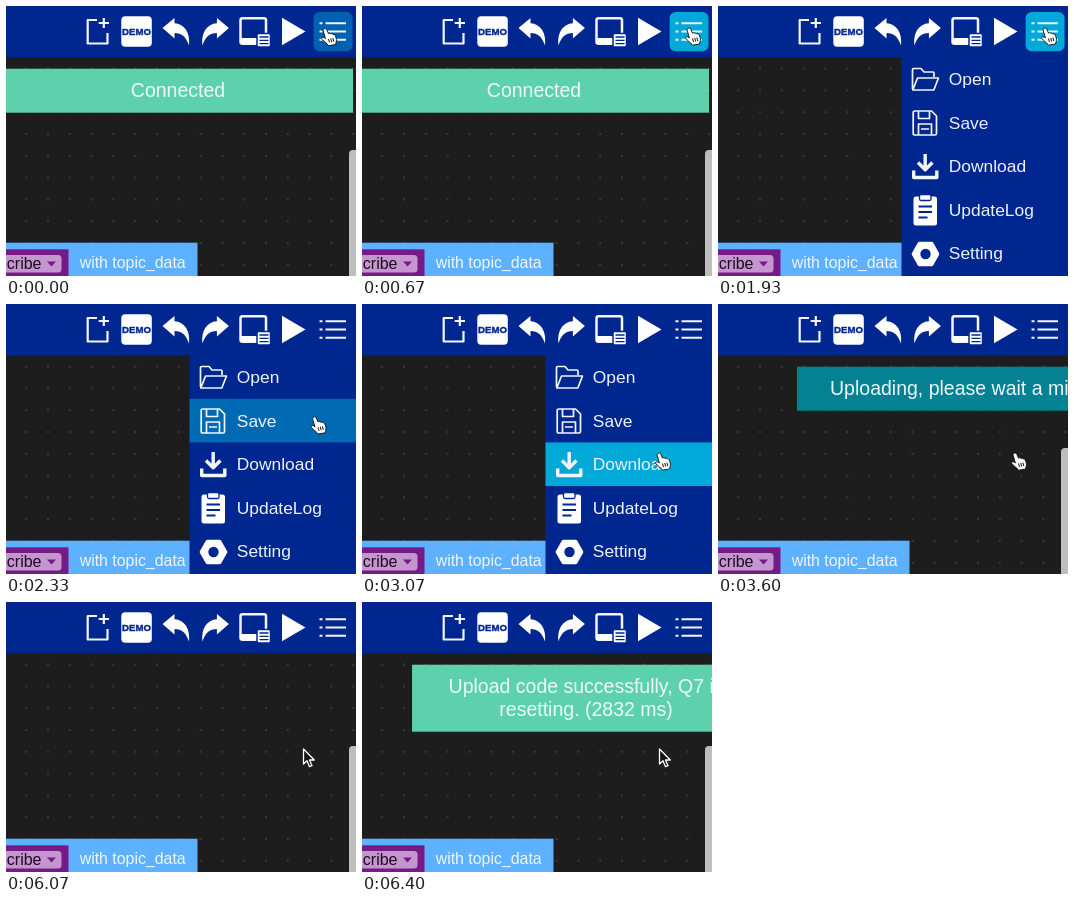
Recreate the animation shown at these times as an HTML page. Size 350 px wide and 270 px high, loop 6.47 s.

```html
<!DOCTYPE html>
<html lang="en">
<head>
<meta charset="utf-8">
<title>Block editor upload</title>
<style>
html, body { margin: 0; width: 100%; height: 100%; overflow: hidden; background: #1d1d1d; }
svg { display: block; width: 350px; height: 270px; font-family: "Liberation Sans", Arial, sans-serif; }
.line { fill: none; stroke: #f2f5fb; stroke-width: 1.7; stroke-linejoin: round; }
.white { fill: #fff; }
.navy { fill: #00278f; }
.toast text { font-size: 19.5px; fill: #ecf8f6; text-anchor: middle; }
.menu text { font-size: 17.4px; fill: #edf1fa; }
</style>
</head>
<body>
<svg viewBox="0 0 350 270">
  <defs>
    <pattern id="dots" x="9.3" y="51.7" width="21.8" height="21.8" patternUnits="userSpaceOnUse">
      <circle cx="10.9" cy="10.9" r=".75" fill="#606060"/>
    </pattern>
    <path id="arrow" d="M156.500 22 L168.500 12 V17.300 C178.500 17.800 184.500 27 183 39.500 C180 31 176 27 168.500 27 V32.500 Z"/>
  </defs>

  <!-- workspace -->
  <rect width="350" height="270" fill="#1d1d1d"/>
  <rect y="52" width="350" height="218" fill="url(#dots)"/>
  <rect x="-5" y="236.700" width="196.500" height="40" fill="#5eb1ff"/>
  <rect x="-5" y="243.300" width="67.500" height="35" fill="#751a86"/>
  <rect x="-10" y="249" width="65.500" height="17.500" rx="3.500" fill="#c595d0"/>
  <text x="35.500" y="262.700" font-size="16" text-anchor="end" fill="#1c0a20">Subscribe</text>
  <path d="M41 255.500 H50 L45.500 260.500 Z" fill="#751a86"/>
  <text x="73.700" y="262" font-size="15.900" fill="#edf6ff">with topic_data</text>
  <rect x="343" y="144" width="14" height="140" rx="4" fill="#bdbdbd"/>

  <!-- notifications -->
  <g class="toast" id="connected">
    <rect x="-2" y="62.700" width="349" height="44" fill="#5dd1ac"/>
    <text x="172" y="91">Connected</text>
  </g>
  <g class="toast" id="uploading">
    <rect x="-2" y="62.700" width="349" height="44" fill="#048294"/>
    <text x="172" y="91">Uploading, please wait a minute.</text>
  </g>
  <g class="toast" id="success">
    <rect x="-2" y="62.700" width="349" height="67" fill="#5dd1ac"/>
    <text x="172" y="91">Upload code successfully, Q7 is</text>
    <text x="172" y="114">resetting. (2832 ms)</text>
  </g>

  <!-- menu -->
  <g class="menu" id="menu">
    <rect class="navy" x="183.500" y="50" width="167" height="220"/>
    <g id="rows"></g>
    <path class="line" d="M194.500 83 V63.500 Q194.500 62.500 195.500 62.500 H203 L206 66 H215 Q216 66 216 67 V71 M194.800 84 L199.500 72 H220.500 L215.800 84 Z"/>
    <path class="line" d="M197 105 H213.500 L218.500 110 V127.500 Q218.500 129 217 129 H197 Q195.200 129 195.200 127.500 V106.500 Q195.200 105 197 105 Z M200.500 105 V112.500 H211.500 V105 M200.500 129 V118 H213.500 V129 M203 123 H211"/>
    <path class="line" style="stroke-width:3.400" d="M207.200 148 V162 M200 156.500 L207.200 163.700 L214.400 156.500 M195.700 164.500 V171.500 H218.800 V164.500"/>
    <rect class="white" x="195.500" y="190.500" width="23.500" height="29" rx="2.500"/>
    <rect x="201.500" y="188.500" width="11.500" height="6" rx="1.500" fill="#fff" stroke="#00278f" stroke-width="1.300"/>
    <path fill="none" stroke="#00278f" stroke-width="2" d="M200.500 200.500 H214 M200.500 206 H214 M200.500 211.500 H209.500"/>
    <path fill="#fff" stroke="#fff" stroke-width="4" stroke-linejoin="round" d="M219.300 248 L213.500 258.300 H201.500 L195.700 248 L201.500 237.700 H213.500 Z"/>
    <circle class="navy" cx="207.500" cy="248" r="5.200"/>
    <g id="labels"></g>
  </g>

  <!-- toolbar -->
  <rect class="navy" width="350" height="51.500"/>
  <rect id="hover" x="307.600" y="6" width="38.900" height="39.300" rx="6" fill="#00a9d8"/>
  <path class="line" style="stroke-width:2.200" d="M91 14 H81.700 V37.500 H101.500 V27 M97.800 12 V22 M92.700 17 H103"/>
  <rect class="white" x="115.300" y="10.300" width="30.500" height="30.500" rx="4"/>
  <text x="130.500" y="29.300" font-size="9.600" font-weight="bold" text-anchor="middle" fill="#00278f" stroke="#00278f" stroke-width=".4">DEMO</text>
  <use href="#arrow" class="white"/>
  <use href="#arrow" class="white" transform="matrix(-1 0 0 1 379.400 0)"/>
  <rect class="line" style="stroke-width:2.500" x="234.500" y="12.300" width="25.500" height="25.500" rx="2"/>
  <rect class="white" x="234.500" y="32" width="20" height="6"/>
  <rect x="251" y="27.500" width="13.500" height="13.500" rx="1.500" fill="#fff" stroke="#00278f" stroke-width="1.500"/>
  <path stroke="#00278f" stroke-width="1.300" d="M253.500 31 H262.500 M253.500 34.300 H262.500 M253.500 37.600 H262.500"/>
  <path class="white" d="M276 11.800 L299.500 25.500 L276 39.300 Z"/>
  <path fill="none" stroke="#f2f5fb" stroke-width="2.100" d="M313.500 17.300 h3 m3 0 h20.500 M313.500 25.500 h3 m3 0 h20.500 M313.500 33.700 h3 m3 0 h20.500"/>

  <!-- pointers -->
  <g id="hand">
    <path transform="scale(1.08 1)" fill="#fff" stroke="#111" stroke-width=".9" d="M3.400 1.200c1-.5 2 0 2.400.9l1.600 4c.6-.6 1.800-.6 2.200.3.700-.5 1.800-.2 2.100.6.800-.3 1.700.1 2 1 .5 1.500 1.300 3.500 1 5.600-.1 1-.6 1.700-.6 3.400l-6.600 1.200c-.6-1.200-2-2.200-3.400-3.600-.9-.9-2.400-2.300-2.900-3.200-.5-1 .4-1.900 1.400-1.600.7.2 1.300.7 1.900 1.200L2.500 3.400c-.3-.9 0-1.800.9-2.200z"/>
    <path fill="none" stroke="#111" d="M8 11.500l1 3.500 M10.200 11l1 3.500 M12.300 10.500l1 3.500"/>
  </g>
  <path id="pointer" fill="#161616" stroke="#fff" stroke-width="1.300" stroke-linejoin="round"
    d="M297.500 147 V162 L301 158.800 L303.500 164.700 L306 163.700 L303.500 158 H308.300 Z"/>
</svg>
<script>
const LOOP = 6470;
const ROW = 43.6;
const $ = id => document.getElementById(id);

// Piecewise linear value from [time, value] steps.
function at(t, steps) {
  const i = steps.findIndex(s => s[0] > t);
  if (i < 0) return steps[steps.length - 1][1];
  if (i === 0) return steps[0][1];
  const [t0, a] = steps[i - 1], [t1, b] = steps[i];
  return a + (b - a) * (t - t0) / (t1 - t0);
}

const cursorX = [[0, 314.5], [70, 314.5], [200, 322.5], [2000, 322.5], [2130, 318],
  [2270, 308], [2470, 295], [2600, 295], [2670, 292.5]];
const cursorY = [[0, 21.5], [200, 21], [2000, 21], [2130, 45],
  [2270, 95], [2470, 150], [2600, 150], [2670, 148]];
const hover = [[70, .45], [200, 1], [2050, 1], [2230, 0]];
const menu = [[790, 0], [1000, 1], [3260, 1], [3400, 0]];
const rowHover = [
  [[2100, 0], [2190, .6], [2330, 0]],
  [[2230, 0], [2310, .6], [2450, 0]],
  [[2350, 0], [2500, 1]]
];

const NS = "http://www.w3.org/2000/svg";
function add(parent, tag, attrs, text = "") {
  const el = document.createElementNS(NS, tag);
  for (const k in attrs) el.setAttribute(k, attrs[k]);
  el.textContent = text;
  return parent.appendChild(el);
}

const rows = rowHover.map((_, i) => add($("rows"), "rect",
  { x: 183.5, y: 51.2 + i * ROW, width: 167, height: ROW, fill: "#00a9d8" }));
["Open", "Save", "Download", "UpdateLog", "Setting"].forEach((label, i) =>
  add($("labels"), "text", { x: 230.8, y: 79 + i * ROW }, label));

const show = (el, on) => { el.style.display = on ? "" : "none"; };
const move = (el, x, y) => el.setAttribute("transform", `translate(${x} ${y})`);

// Toast enters from the right, then goes at once.
function slide(el, t, start, end) {
  const p = Math.min(1, Math.max(0, (t - start) / 650));
  show(el, t >= start && t < end);
  move(el, 350 * (1 - p) ** 5, 0);
}

function draw(t) {
  show($("connected"), t < 800);
  slide($("uploading"), t, 3436, 6070);
  slide($("success"), t, 6195, LOOP);
  $("hover").style.opacity = at(t, hover);
  $("menu").style.opacity = at(t, menu);
  rows.forEach((row, i) => { row.style.opacity = at(t, rowHover[i]); });
  const arrow = t >= 3730;
  show($("hand"), !arrow);
  show($("pointer"), arrow);
  move($("hand"), at(t, cursorX), at(t, cursorY));
}

const begin = performance.now();
function tick() {
  draw((performance.now() - begin) % LOOP);
  requestAnimationFrame(tick);
}
tick();
</script>
</body>
</html>
```
